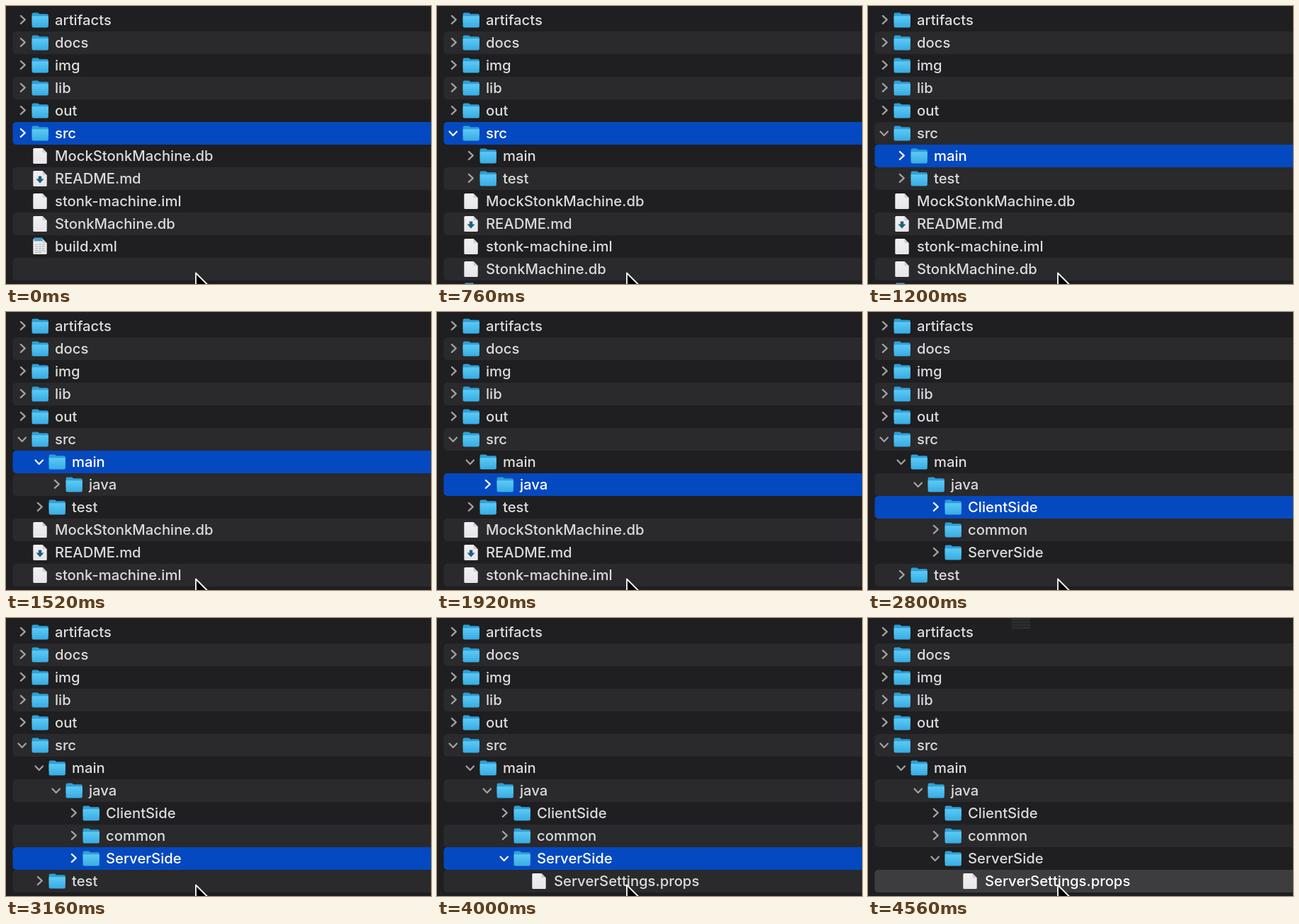
Animation of 600x393 px, one loop 4600 ms. Source, as an HTML page:

```html
<!DOCTYPE html>
<html lang="en">
<head>
<meta charset="utf-8">
<title>File list</title>
<style>
  html, body { margin: 0; width: 100%; height: 100%; overflow: hidden; background: #1f1e20; }
  svg { display: block; width: 600px; height: 393px; }
  text { font: 500 20.25px Inter, Roboto, sans-serif; fill: #dbdbdc; }
  .chevron { fill: none; stroke: #a2a2a5; stroke-width: 2.2; stroke-linecap: round; stroke-linejoin: round; }
  .picked text { fill: #ffffff; }
  .picked .chevron { stroke: #f4f7ff; }
  .band { filter: blur(.4px); }
</style>
</head>
<body>
<svg id="stage" viewBox="0 0 600 393">
  <defs>
    <linearGradient id="front" x1="0" y1="0" x2="0" y2="1">
      <stop offset="0" stop-color="#5ccaf5"/>
      <stop offset="1" stop-color="#38abe3"/>
    </linearGradient>
    <linearGradient id="paper" x1="0" y1="0" x2="0" y2="1">
      <stop offset="0" stop-color="#f2f1f2"/>
      <stop offset="1" stop-color="#e6e5e7"/>
    </linearGradient>
    <g id="folder">
      <path d="M36.600-8.600q0-2 2-2h5.700q1 0 1.800.8l1 1h10.700q2 0 2 2V4H36.600z" fill="#2f9fd6"/>
      <path d="M36.600-5.800h23.200V8.600q0 2-2 2H38.600q-2 0-2-2z" fill="url(#front)"/>
    </g>
    <g id="file">
      <path d="M38.300-9.500q0-1.500 1.500-1.500h11.700L57.700-4.800V9.500q0 1.500-1.500 1.500H39.800q-1.500 0-1.500-1.500z" fill="url(#paper)"/>
      <path d="M51.500-11V-6.300q0 1.500 1.500 1.500h4.700z" fill="#cfced1"/>
    </g>
    <g id="markdown">
      <use href="#file"/>
      <path d="M45.800-3.500h4.400v4h3.300L48 6.500 42.500 .5h3.300z" fill="#1f5f82"/>
    </g>
    <g id="xml">
      <use href="#file"/>
      <path d="M39.500-12.500h12v5h-12z" fill="#4b9fc9"/>
      <path d="M41-3h14M41 0h14M41 3h14M41 6h14M41 8.500h10" stroke="#a9afb5" stroke-width="1.200" stroke-dasharray="4 1"/>
    </g>
  </defs>
</svg>
<script>
const LOOP = 4600, ROW = 32, INDENT = 24;
const stage = document.getElementById('stage');

const dir = (name, ...kids) => ({ name, kids });
const file = (name, icon = 'file') => ({ name, icon });

const tree = [
  dir('artifacts'), dir('docs'), dir('img'), dir('lib'), dir('out'),
  dir('src',
    dir('main',
      dir('java',
        dir('ClientSide'), dir('common'),
        dir('ServerSide', file('ServerSettings.props')))),
    dir('test')),
  file('MockStonkMachine.db'), file('README.md', 'markdown'),
  file('stonk-machine.iml'), file('StonkMachine.db'), file('build.xml', 'xml')
];

// Folders open in this order; each step is [start, open folders, selected row, colour].
const opening = ['src', 'main', 'java', 'ServerSide'];
const BLUE = '#0549c0', GREY = '#3d3d3f';
const steps = [
  [0, 0, 'src', BLUE],
  [720, 1, 'src', BLUE],
  [960, 1, 'main', BLUE],
  [1440, 2, 'main', BLUE],
  [1800, 2, 'java', BLUE],
  [2200, 3, 'java', BLUE],
  [2640, 3, 'ClientSide', BLUE],
  [2840, 3, 'common', BLUE],
  [3000, 3, 'ServerSide', BLUE],
  [3640, 4, 'ServerSide', BLUE],
  [4240, 4, 'ServerSettings.props', BLUE],
  [4520, 4, 'ServerSettings.props', GREY]
];

const flatten = (nodes, open, depth = 0) => nodes.flatMap(node => [
  { ...node, depth },
  ...(open.includes(node.name) ? flatten(node.kids, open, depth + 1) : [])
]);

const band = (i, color) =>
  `<rect class="band" x="9.5" y="${i * ROW + 4}" width="610" height="${ROW}" rx="5" fill="${color}"/>`;

function rowMarkup(row, i, open, picked) {
  const arrow = open.includes(row.name) ? 'M17.5-2.5L22.7 3 28-2.5' : 'M20.8-6.1L26.8-.6 20.8 4.9';
  return `<g class="${picked ? 'picked' : ''}" transform="translate(${row.depth * INDENT} ${i * ROW + 20})">
    ${row.kids ? `<path class="chevron" d="${arrow}"/>` : ''}
    <use href="#${row.kids ? 'folder' : row.icon}"/>
    <text x="69" y="7">${row.name}</text></g>`;
}

function sceneMarkup(openCount, selected, color) {
  const open = opening.slice(0, openCount);
  const rows = flatten(tree, open).slice(0, 13);
  let out = '<rect width="600" height="393" fill="#1f1e20"/>';
  for (let i = 1; i < 12; i += 2) out += band(i, '#2a292b');
  rows.forEach((row, i) => {
    const picked = row.name === selected;
    if (picked) out += band(i, color);
    out += rowMarkup(row, i, open, picked);
  });
  return out;
}

function addLayer(markup, from, to) {
  const g = document.createElementNS('http://www.w3.org/2000/svg', 'g');
  g.innerHTML = markup;
  stage.append(g);
  const key = (opacity, time) => ({ opacity, offset: time / LOOP, easing: 'steps(1, end)' });
  const keys = [key(1, from), key(to < LOOP ? 0 : 1, to)];
  if (from > 0) keys.unshift(key(0, 0));
  if (to < LOOP) keys.push(key(0, LOOP));
  return g.animate(keys, { duration: LOOP, iterations: Infinity });
}

const layers = steps.map(([start, ...scene], i) =>
  addLayer(sceneMarkup(...scene), start, i + 1 < steps.length ? steps[i + 1][0] : LOOP));

// Faint preview window appearing at the top edge.
layers.push(addLayer(
  `<rect x="202" width="27" height="16" fill="#242526"/>
   <path d="M203 2h26M203 6h26M203 10h26M203 14h26" stroke="#303234" stroke-width="1.5"/>`,
  4560, LOOP));

const startTime = document.timeline.currentTime ?? 0;
layers.forEach(layer => { layer.startTime = startTime; });

stage.insertAdjacentHTML('beforeend',
  '<path d="M268 377.5V404L288 397.5z" fill="#000" stroke="#f2f2f2" stroke-width="1.9" stroke-linejoin="round"/>');
</script>
</body>
</html>
```
